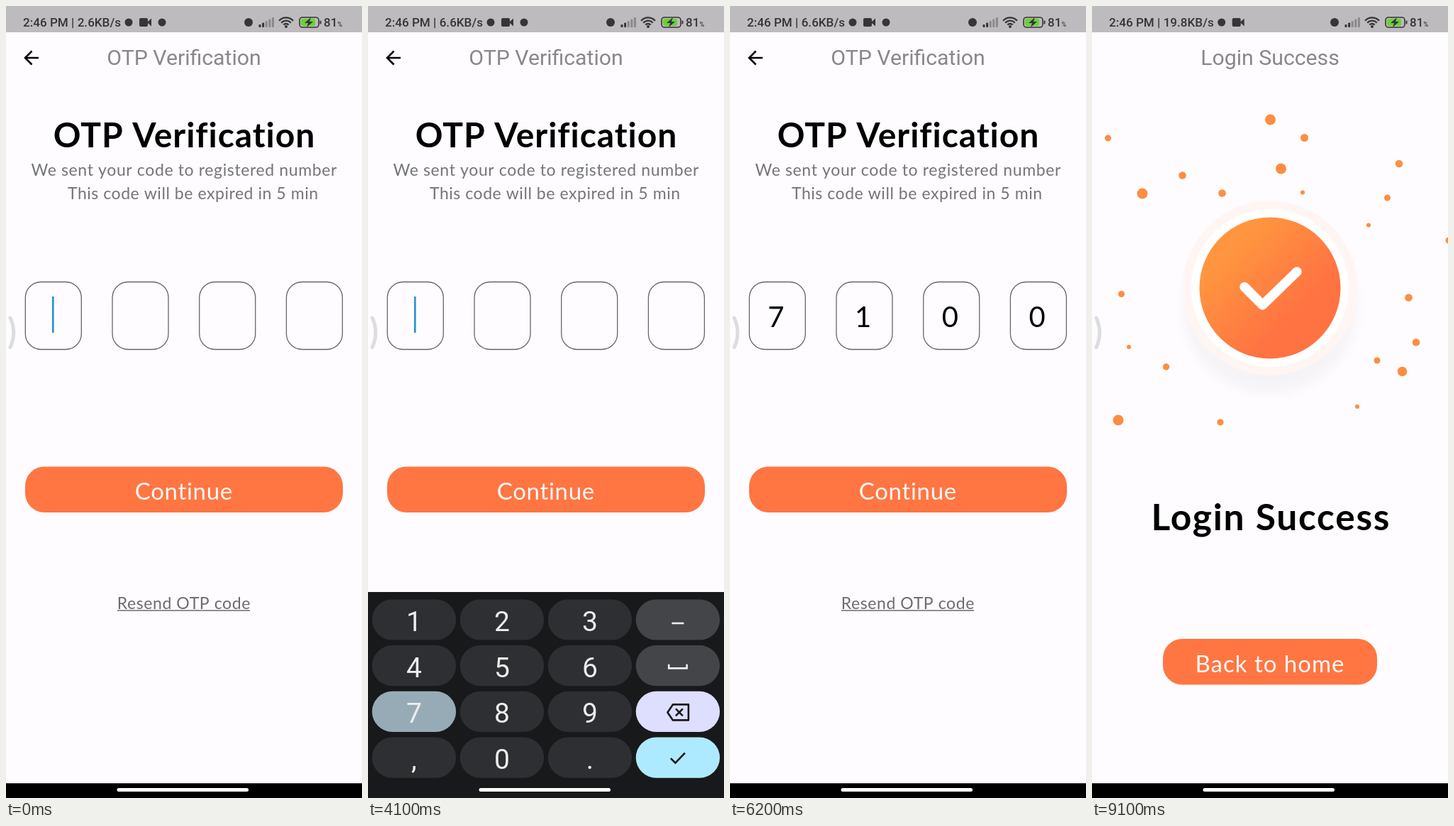
Write an HTML page with a canvas that moves like this. It is 502 by 1115 pixels and loops after 9.2 s.

```html
<!DOCTYPE html>
<html lang="en">
<head>
<meta charset="utf-8">
<title>OTP verification</title>
<style>
  html, body { margin: 0; width: 100%; height: 100%; overflow: hidden; background: #fefcff; }
  canvas { display: block; width: 502px; height: 1115px; }
</style>
</head>
<body>
<canvas id="stage"></canvas>
<script>
const W = 502, H = 1115, NAV = 1094.5, LOOP = 9200;
const PAGE = '#fefcff', ORANGE = '#ff7643', INK = '#363537';
const UI = 'Lato, "Open Sans", sans-serif';
const SYS = 'Roboto, "Noto Sans", sans-serif';

const canvas = document.getElementById('stage');
const ctx = canvas.getContext('2d');
const dpr = window.devicePixelRatio || 1;
canvas.width = W * dpr;
canvas.height = H * dpr;

const clamp = v => Math.min(1, Math.max(0, v));
const span = (t, from, length) => clamp((t - from) / length);
const lerp = (a, b, p) => a + (b - a) * p;
const easeOut = (p, power = 2) => 1 - Math.pow(1 - p, power);

// Timeline in ms
const TYPED = [4200, 4500, 4900, 5100];
const CODE = '7100';
const PRESSES = [['7', 4080, 4240], ['1', 4390, 4550], ['0', 4740, 4900], ['0', 4980, 5120]];
const OPEN = 1507, CLOSE = 5100, TAP = 6855, NAVIGATE = 7300;

function text(str, x, y, font, color, spacing = 0, align = 'center') {
  ctx.font = font;
  ctx.fillStyle = color;
  ctx.textAlign = align;
  ctx.letterSpacing = spacing + 'px';
  ctx.fillText(str, align === 'center' ? x + spacing / 2 : x, y);
}

function rounded(x, y, w, h, r) {
  ctx.beginPath();
  ctx.roundRect(x, y, w, h, r);
}

function box(x, y, w, h, r, color) {
  rounded(x, y, w, h, r);
  ctx.fillStyle = color;
  ctx.fill();
}

function disc(x, y, r, color) {
  ctx.beginPath();
  ctx.arc(x, y, r, 0, Math.PI * 2);
  ctx.fillStyle = color;
  ctx.fill();
}

function line(points, width, color, cap = 'butt', close = false) {
  ctx.beginPath();
  points.forEach(([x, y]) => ctx.lineTo(x, y));
  if (close) ctx.closePath();
  ctx.lineWidth = width;
  ctx.strokeStyle = color;
  ctx.lineCap = cap;
  ctx.lineJoin = cap === 'round' ? 'round' : 'miter';
  ctx.stroke();
}

function polygon(points, color) {
  ctx.beginPath();
  points.forEach(([x, y]) => ctx.lineTo(x, y));
  ctx.fillStyle = color;
  ctx.fill();
}

function statusBar(t) {
  ctx.fillStyle = 'rgba(0,0,0,0.26)';
  ctx.fillRect(0, 0, W, 37);

  const late = t >= 7600;
  const speed = late ? '19.8' : t >= 3600 ? '6.6' : '2.6';
  const dx = late ? 9.7 : 0;
  text(`2:46 PM | ${speed}KB/s`, 24, 29, '500 17.1px ' + SYS, INK, 0, 'left');
  disc(173 + dx, 23, 5.5, INK);
  box(188 + dx, 17, 12, 12, 2, INK);
  polygon([[199 + dx, 23], [205 + dx, 17.5], [205 + dx, 28.5]], INK);
  if (!late) disc(220, 23, 5.5, INK);

  disc(342, 23, 6, INK);
  for (let i = 0; i < 5; i++) {
    const h = 4 + i * 2.5;
    box(356.5 + i * 4.6, 30 - h, 3, h, 1, i < 2 ? INK : '#8b898b');
  }

  ctx.strokeStyle = INK;
  ctx.lineCap = 'butt';
  ctx.lineWidth = 2.3;
  for (const r of [5, 9.3, 13.6]) {
    ctx.beginPath();
    ctx.arc(395, 30, r, -Math.PI * 0.76, -Math.PI * 0.24);
    ctx.stroke();
  }
  disc(395, 29, 2, INK);

  rounded(414, 16, 27, 14, 4);
  ctx.lineWidth = 1.6;
  ctx.stroke();
  box(416, 18, 20, 10, 2, '#68d334');
  box(442.5, 20.5, 2, 5, 1, INK);
  polygon([[430, 16], [421, 24], [426, 24], [424, 30], [433, 22], [428, 22]], INK);
  text('81', 448, 29, '500 17px ' + SYS, INK, 0, 'left');
  text('%', 467.5, 29, '500 9px ' + SYS, INK, 0, 'left');
}

function appBar(title) {
  ctx.fillStyle = PAGE;
  ctx.fillRect(0, 0, W, NAV);
  text(title, 251, 83, '30.25px ' + SYS, '#89878a');
}

function codeFields(t) {
  const count = TYPED.filter(at => t >= at).length;
  const blink = count ? t - TYPED[count - 1] : t + 300;
  for (let i = 0; i < 4; i++) {
    const x = 27.3 + i * 122.7;
    rounded(x, 388.5, 79, 95, 22);
    ctx.lineWidth = 1.3;
    ctx.strokeStyle = '#666567';
    ctx.stroke();
    if (i < count) text(CODE[i], x + 37.6, 452, '40px ' + UI, '#000');
    else if (i === count && blink % 1000 < 500) {
      ctx.fillStyle = '#2491d6';
      ctx.fillRect(x + 37.7, 409, 2.6, 51);
    }
  }
}

function ripple(t) {
  const p = span(t, TAP, 430);
  const fade = 1 - span(t, 7250, 300);
  if (p <= 0 || fade <= 0) return;
  ctx.save();
  rounded(27, 648.5, 448, 64.5, 27);
  ctx.clip();
  disc(lerp(215, 251, p ** 1.6), 681, lerp(69, 231, easeOut(p, 1.4)), `rgba(255,255,255,${0.24 * fade})`);
  ctx.restore();
}

function otpPage(t) {
  appBar('OTP Verification');
  line([[46, 73], [27.5, 73]], 2.6, '#000');
  line([[36.5, 63.5], [27, 73], [36.5, 82.5]], 2.6, '#000');

  text('OTP Verification', 251, 199, '700 48px ' + UI, '#000', 0.95);
  text('We sent your code to registered number', 251, 239, '23px ' + UI, '#757477', 0.63);
  text('This code will be expired in 5 min', 263.5, 272, '23px ' + UI, '#757477', 0.55);
  codeFields(t);

  const lift = span(t, TAP, 200) * (1 - span(t, 7250, 200));
  ctx.save();
  ctx.shadowColor = `rgba(0,0,0,${0.35 * lift})`;
  ctx.shadowBlur = 3 * dpr;
  ctx.shadowOffsetY = dpr;
  box(27, 648.5, 448, 64.5, 27, ORANGE);
  ctx.restore();
  ripple(t);
  text('Continue', 250.5, 695, '33px ' + UI, '#fffaf7', 0.7);

  text('Resend OTP code', 250.5, 849, '23px ' + UI, '#6c6b6e', 0.6);
  ctx.fillStyle = '#6c6b6e';
  ctx.fillRect(157, 850.3, 187, 1.5);
}

// x, y, radius
const DOTS = [
  [251.5, 160, 7.5], [299.5, 185.5, 5.5], [22.5, 186, 4.5], [433, 222, 5.3], [266.5, 229, 7.5],
  [127.5, 238.5, 5.3], [71, 264, 7.5], [183.5, 263.5, 5.3], [297, 262.5, 3], [416.5, 270, 4.5],
  [390, 308.5, 3], [503, 330, 4.5], [41.5, 405.5, 4.5], [446.5, 410.5, 5.3], [457, 473.5, 5.3],
  [52, 480, 3], [402, 499, 4.5], [104.5, 508, 4.7], [437.5, 514.5, 6.8], [374, 564, 3],
  [37, 583, 7.5], [181, 586, 4.6]
];

function successPage() {
  appBar('Login Success');
  for (const [x, y, r] of DOTS) disc(x, y, r, '#fc8e42');

  const shade = ctx.createRadialGradient(251, 422, 85, 251, 422, 134);
  shade.addColorStop(0, 'rgba(60,60,70,0.06)');
  shade.addColorStop(0.65, 'rgba(60,60,70,0.035)');
  shade.addColorStop(1, 'rgba(60,60,70,0)');
  disc(251, 422, 134, shade);
  disc(251, 397, 123, '#fff6f3');
  disc(251, 397, 111, '#fff');
  const fill = ctx.createLinearGradient(180, 327, 322, 467);
  fill.addColorStop(0.1, '#ff963f');
  fill.addColorStop(0.75, '#ff7342');
  disc(251, 397, 99.5, fill);
  line([[215, 395.5], [240.5, 421], [289, 374]], 13.5, '#fff', 'round');

  text('Login Success', 251.5, 738, '700 51.5px ' + UI, '#000', 1.75);
  box(100, 891, 302, 64.5, 27, ORANGE);
  text('Back to home', 250.5, 937.5, '33px ' + UI, '#fffaf7', 1);
}

function zoomed(scale, alpha, draw) {
  ctx.save();
  ctx.beginPath();
  ctx.rect(0, 0, W, NAV);
  ctx.clip();
  ctx.globalAlpha = alpha;
  ctx.translate(W / 2, NAV / 2);
  ctx.scale(scale, scale);
  ctx.translate(-W / 2, -NAV / 2);
  draw();
  ctx.restore();
}

const KEYS = ['123-', '456_', '789<', ',0.>'];
const KEY_COLORS = { '-': '#444548', '_': '#444548', '<': '#dedeff', '>': '#aeeaff' };
const GLYPHS = {
  '-': (x, y) => line([[x - 8.5, y + 5], [x + 8.5, y + 5]], 2.6, '#ededee'),
  '_': (x, y) => line([[x - 12.7, y - 2], [x - 12.7, y + 3.7], [x + 12.7, y + 3.7], [x + 12.7, y - 2]], 2.6, '#ededee'),
  '<': (x, y) => {
    line([[x - 14.5, y + 1], [x - 7, y - 10], [x + 15, y - 10], [x + 15, y + 12], [x - 7, y + 12]], 2.6, '#18191b', 'round', true);
    line([[x - 3, y - 4], [x + 7, y + 6]], 2.6, '#18191b');
    line([[x + 7, y - 4], [x - 3, y + 6]], 2.6, '#18191b');
  },
  '>': (x, y) => line([[x - 10, y + 1], [x - 3.5, y + 7.5], [x + 10, y - 6.5]], 2.7, '#18191b')
};

function keyboard(t) {
  const shown = easeOut(span(t, OPEN, 400)) - easeOut(span(t, CLOSE, 300));
  if (shown <= 0) return;
  const top = H - 290 * shown;
  ctx.fillStyle = '#18191b';
  ctx.fillRect(0, top, W, 290);
  const held = PRESSES.find(([, down, up]) => t >= down && t < up);
  KEYS.forEach((row, r) => [...row].forEach((key, c) => {
    const x = 5.7 + c * 124, y = top + 10.4 + r * 64.7;
    const pressed = held && held[0] === key;
    box(x, y, 118.4, 57.2, 28.6, pressed ? '#97abb7' : KEY_COLORS[key] || '#2e2f32');
    if (GLYPHS[key]) GLYPHS[key](x + 59.2, y + 28.6);
    else text(key, x + 59.2, y + 44.5, '39px ' + SYS, '#ededee');
  }));
}

function render(t) {
  ctx.setTransform(dpr, 0, 0, dpr, 0, 0);
  ctx.fillStyle = '#000';
  ctx.fillRect(0, 0, W, H);

  const p = span(t, NAVIGATE, 300);
  const eased = easeOut(p, 3);
  if (p < 1) zoomed(lerp(1, 1.05, eased), 1, () => otpPage(t));
  if (p > 0 && p < 1) {
    ctx.fillStyle = `rgba(0,0,0,${0.6 * span(p, 0.2075, 0.21)})`;
    ctx.fillRect(0, 0, W, NAV);
  }
  const alpha = span(p, 0.125, 0.125);
  if (alpha > 0) zoomed(lerp(0.85, 1, eased), alpha, successPage);

  statusBar(t);
  keyboard(t);

  // Edge handle and home pill
  ctx.beginPath();
  ctx.moveTo(6, 439);
  ctx.quadraticCurveTo(15.5, 460, 6, 480.5);
  ctx.lineCap = 'round';
  ctx.lineWidth = 5;
  ctx.strokeStyle = '#dddcde';
  ctx.stroke();
  box(156.5, 1101, 185.5, 5, 2.5, '#fff');
}

const start = performance.now();
function tick(now) {
  render(Math.max(0, now - start) % LOOP);
  requestAnimationFrame(tick);
}
render(0);
requestAnimationFrame(tick);
</script>
</body>
</html>
```
